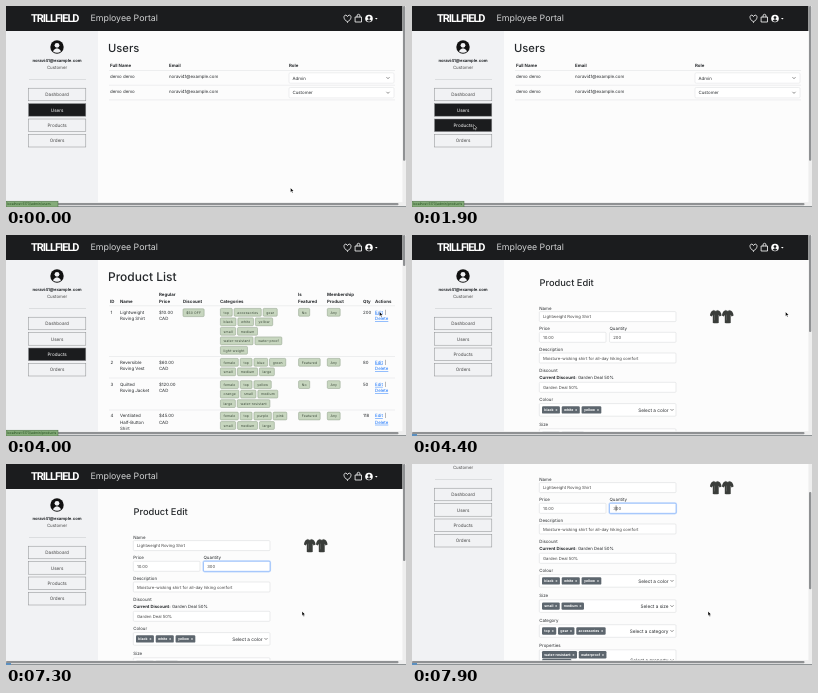
Animation, 400 px wide and 201 px high, one loop 8000 ms. Source, as an HTML page:

```html
<!DOCTYPE html>
<html lang="en">
<head>
<meta charset="utf-8">
<title>Employee Portal</title>
<style>
html, body { margin: 0; width: 100%; height: 100%; overflow: hidden; background: #fcfcfc; }
svg { display: block; width: 100vw; height: 100vh; }
text { font-family: Inter, "Open Sans", sans-serif; white-space: pre; text-rendering: geometricPrecision; }
.logo { font-family: Roboto, "Liberation Sans", sans-serif; letter-spacing: -1px; }
</style>
</head>
<body>
<svg id="stage" viewBox="0 0 400 201"></svg>
<script>
const LOOP = 8000, STEP = 100, VIEW_H = 201;
const EMAIL = 'noravi41@example.com', DEAL = 'Garden Deal 50%', SHIRT = 'Lightweight Roving Shirt';
const INK = '#25282b', DARK = '#1b1c1e', LINE = '#dcdee0', SIDE = '#f1f2f4';
const stage = document.getElementById('stage');

function el(parent, name, attrs) {
  const n = document.createElementNS('http://www.w3.org/2000/svg', name);
  for (const k in attrs) n.setAttribute(k, attrs[k]);
  return parent.appendChild(n);
}
const group = parent => el(parent, 'g', {});
const box = (g, x, y, width, height, fill, more) => el(g, 'rect', { x, y, width, height, fill, ...more });
const path = (g, d, more) => el(g, 'path', { d, fill: 'none', 'stroke-linecap': 'round', 'stroke-linejoin': 'round', ...more });
const rule = (g, x1, x2, y, stroke = LINE) => el(g, 'line', { x1, x2, y1: y, y2: y, stroke, 'stroke-width': .5 });
const show = (n, on) => n.setAttribute('visibility', on ? 'visible' : 'hidden');

// y is the vertical middle of the capitals
function text(g, x, y, str, size = 4.4, more) {
  const n = el(g, 'text', { x, y: y + size * .36, 'font-size': size, fill: INK, ...more });
  n.textContent = str;
  return n;
}
const bold = (g, x, y, str, size = 4.4, more) => text(g, x, y, str, size, { 'font-weight': 700, ...more });
const lines = (g, x, y, list, draw = text) => list.forEach((s, i) => draw(g, x, y + i * 6.5, s));

function chevron(g, x, y) {
  path(g, `M${x - 1.3} ${y - .6}l1.3 1.3 1.3 -1.3`, { stroke: '#444', 'stroke-width': .6 });
}
function person(g, x, y, r, fill, back) {
  el(g, 'circle', { cx: x, cy: y, r, fill });
  el(g, 'circle', { cx: x, cy: y - r * .25, r: r * .36, fill: back });
  path(g, `M${x - r * .62} ${y + r * .62}q${r * .62} ${-r * .85} ${r * 1.24} 0q${-r * .62} ${r * .5} ${-r * 1.24} 0z`, { fill: back });
}

const page = group(stage);

// sidebar
const side = group(page);
box(side, 0, 25, 92, 300, SIDE);
person(side, 51, 41, 6.7, '#111', SIDE);
bold(side, 51, 54.5, EMAIL, 4.2, { 'text-anchor': 'middle' });
text(side, 51, 61.5, 'Customer', 4.4, { 'text-anchor': 'middle', fill: '#444' });
rule(side, 23, 80, 73.5, '#c4c6c9');
const nav = ['Dashboard', 'Users', 'Products', 'Orders'].map((name, i) => {
  const y = 82.2 + i * 15.4;
  const back = box(side, 22.5, y, 57.3, 12.6, SIDE, { stroke: '#8a8c8e', 'stroke-width': .5 });
  const label = text(side, 51.1, y + 6.3, name, 4.6, { 'text-anchor': 'middle' });
  return on => {
    back.setAttribute('fill', on ? DARK : SIDE);
    label.setAttribute('fill', on ? '#fff' : '#444');
  };
});

// header
box(page, 0, 0, 400, 25, DARK);
text(page, 25, 12, 'TRILLFIELD', 11, { class: 'logo', 'font-weight': 700, fill: '#fff' });
text(page, 84.5, 11.8, 'Employee Portal', 8.8, { fill: '#cfd0d1' });
const white = { stroke: '#fff', 'stroke-width': .8 };
path(page, 'M341.5 16 C336 12.5 338 8.6 340 9.2 Q341.2 9.6 341.5 10.6 Q341.8 9.6 343 9.2 C345 8.6 347 12.5 341.5 16z', white);
path(page, 'M349.5 11h6v5h-6zM351 11v-1q0 -1.7 1.5 -1.7t1.5 1.7v1', white);
person(page, 363, 12.5, 3.8, '#fff', DARK);
path(page, 'M369 12h2.6l-1.3 1.4z', { fill: '#fff' });

// users view
const users = group(page);
text(users, 102, 41.5, 'Users', 11.2, { 'font-weight': 500 });
[[104, 'Full Name'], [163, 'Email'], [283, 'Role']].forEach(([x, s]) => bold(users, x, 59.3, s));
rule(users, 103, 389, 64.5);
['Admin', 'Customer'].forEach((role, i) => {
  const y = 71 + i * 14.7;
  text(users, 104, y - .6, 'demo demo');
  text(users, 163, y - .6, EMAIL);
  box(users, 283, y - 4.2, 105, 10.4, '#fff', { rx: 1.2, stroke: LINE, 'stroke-width': .5 });
  text(users, 286.5, y + 1.2, role, 4.4);
  chevron(users, 382, y + 1);
  rule(users, 103, 389, y + 8.2);
});

// product list view
const list = group(page);
text(list, 102, 41.7, 'Product List', 12, { 'font-weight': 500 });
[[104, 'ID'], [114, 'Name'], [177, 'Discount'], [214, 'Categories'], [357, 'Qty'], [369, 'Actions']]
  .forEach(([x, s]) => bold(list, x, 66, s));
[[153, 'Regular', 'Price'], [292, 'Is', 'Featured'], [321, 'Membership', 'Product']]
  .forEach(([x, ...s]) => lines(list, x, 59.5, s, bold));
rule(list, 103, 389, 70.8);

function tag(g, x, y, str) {
  const back = box(g, x, y - 4, 10, 7.8, '#c7d6bf', { rx: 1, stroke: '#8b9d84', 'stroke-width': .5 });
  const t = text(g, x + 3.2, y, str, 3.4, { 'letter-spacing': .15, fill: '#3a4838' });
  const w = t.getComputedTextLength() + 6.2;
  back.setAttribute('width', w);
  return x + w + 1.9;
}
[
  [77, 121.5, ['Lightweight', 'Roving Shirt'], '$10.00', 'No', 200,
    'top accessories gear|black white yellow|small medium|water-resistant water-proof|light-weight'],
  [127, 143, ['Reversible', 'Roving Vest'], '$60.00', 'Featured', 80,
    'female top blue green|small medium large'],
  [149.3, 175, ['Quilted', 'Roving Jacket'], '$120.00', 'No', 50,
    'female top yellow|orange small medium|large water-resistant'],
  [180.7, 215, ['Ventilated', 'Half-Button', 'Shirt'], '$45.00', 'Featured', 118,
    'female top purple pink|small medium large']
].forEach(([y, end, name, price, featured, qty, tags], i) => {
  text(list, 104.5, y, i + 1);
  lines(list, 114, y, name);
  lines(list, 153, y, [price, 'CAD']);
  if (!i) tag(list, 177, y + .8, '$50 OFF');
  tags.split('|').forEach((row, r) =>
    row.split(' ').reduce((x, s) => tag(list, x, y + .4 + r * 9.5, s), 214.4));
  tag(list, 292.6, y + .4, featured);
  tag(list, 321.3, y + .4, 'Any');
  text(list, 357, y, qty);
  const link = { fill: '#0d6efd', 'text-decoration': 'underline' };
  text(list, 369, y, 'Edit', 4.4, link);
  text(list, 378.8, y, '|');
  text(list, 369, y + 6.5, 'Delete', 4.4, link);
  rule(list, 103, 389, end);
});

// product edit view
const edit = group(page);
text(edit, 127.5, 47.3, 'Product Edit', 9.3, { 'font-weight': 500 });
const frame = { rx: 1, stroke: LINE, 'stroke-width': .6 };
const halo = box(edit, 197.5, 97.3, 66.5, 10, 'none', { rx: 1, stroke: '#c4dbfd', 'stroke-width': 2.2 });
function field(x, y, w, label, value) {
  if (label) text(edit, x, y - 8.4, label, 4.4);
  const back = box(edit, x, y - 5, w, 10, '#fff', frame);
  return [back, text(edit, x + 3.7, y + .1, value, 4.2, { fill: '#444' })];
}
field(127.3, 81.6, 136.7, 'Name', SHIRT);
field(127.3, 102.3, 66.7, 'Price', '10.00');
const [qtyBox, qtyText] = field(197.5, 102.3, 66.5, 'Quantity', '200');
field(127.3, 123, 136.7, 'Description', 'Moisture-wicking shirt for all-day hiking comfort');
text(edit, 127.3, 135.3, 'Discount', 4.4);
const now = bold(edit, 127.3, 142, 'Current Discount:', 4.3);
text(edit, 128.6 + now.getComputedTextLength(), 142, DEAL, 4.3);
field(127.3, 152.3, 136.7, '', DEAL);

function chip(x, y, str) {
  const back = box(edit, x, y - 3.7, 10, 7.4, '#5d666e', { rx: 1.2 });
  const t = bold(edit, x + 2.3, y, str + '  ×', 3.5, { fill: '#fff' });
  const w = t.getComputedTextLength() + 4.6;
  back.setAttribute('width', w);
  return x + w + 1.8;
}
[
  [164.6, 'Colour', 'black white yellow', 'Select a color'],
  [189.8, 'Size', 'small medium', 'Select a size'],
  [214.7, 'Category', 'top gear accessories', 'Select a category'],
  [239.8, 'Properties', 'water-resistant waterproof|light-weight', 'Select a property']
].forEach(([y, label, chips, hint]) => {
  const rows = chips.split('|'), h = 12.6 + (rows.length - 1) * 8;
  text(edit, 127.3, y, label, 4.4);
  box(edit, 127.3, y + 4, 136.7, h, '#fff', frame);
  rows.forEach((row, r) => row.split(' ').reduce((x, s) => chip(x, y + (rows[1] ? 9 : 10.3) + r * 8, s), 130));
  text(edit, 256.5, y + 4 + h / 2, hint, 4.7, { 'text-anchor': 'end' });
  chevron(edit, 260, y + 4 + h / 2);
});
for (const x of [298.5, 310.5]) {
  path(edit, `M${x + 3.3} 75.3q1.9 1.2 3.8 0q3.4 .6 4 5.2l-2 .9 -.9 -1.6v8.2q-3 .7 -5.9 0v-8.2l-.9 1.6 -2 -.9q.6 -4.6 3.9 -5.2z`, { fill: '#3a3d3a' });
  path(edit, `M${x + 3.3} 75.5q1.9 1.6 3.8 0M${x + 4} 80v5`, { stroke: '#6d716c', 'stroke-width': .5 });
}
const caret = box(edit, 203.8, 99.4, .5, 5.8, '#111');

// window chrome
const TRACK = '#eeeeee', THUMB = '#8f9193';
box(stage, 396.4, 0, 3.6, VIEW_H, TRACK);
const thumb = box(stage, 397, 0, 2.3, 10, THUMB, { rx: 1 });
box(stage, 0, 196.2, 400, 4.8, TRACK);
box(stage, 0, 197, 392.5, 2.2, THUMB, { rx: 1 });
box(stage, 0, 200.2, 400, .8, '#777d80');
box(stage, 0, 199, 5, 2, '#5b8fc0');
const status = group(stage);
box(status, 0, 195.2, 52, 5.8, '#84ab79', { stroke: '#45683f', 'stroke-width': .5 });
const url = text(status, 1, 198.1, '', 3.4, { fill: '#1f4a1a' });

const mouse = path(stage, 'M0 0v4.2l1 -.9 .7 1.6 .8 -.3 -.7 -1.6h1.4z',
  { fill: '#000', stroke: '#fff', 'stroke-width': .4 });

// time, x, y
const moves = [
  [0, 284.5, 182], [900, 61.5, 119], [1900, 61.5, 119], [2600, 274, 75.5], [2700, 274, 75.5],
  [3600, 373.5, 77], [4400, 373.5, 77], [5400, 203.5, 103], [7000, 203.5, 103], [7300, 296, 147.5], [LOOP, 296, 147.5]
];
const scrolls = [[0, 0], [7400, 0], [7900, 58], [LOOP, 58]];
const heights = new Map([[users, 261], [list, 1300], [edit, 416]]);

function at(keys, t) {
  const i = keys.findIndex(k => k[0] > t), a = keys[i - 1], b = keys[i];
  const p = (t - a[0]) / (b[0] - a[0]), e = p * p * (3 - 2 * p);
  return a.slice(1).map((v, n) => v + (b[n + 1] - v) * e);
}

function draw(ms) {
  const t = Math.floor(ms % LOOP / STEP) * STEP;
  const view = t < 2000 ? users : t < 4300 ? list : edit;
  [users, list, edit].forEach(v => show(v, v === view));

  const [mx, my] = at(moves, t), [scroll] = at(scrolls, t);
  const ratio = VIEW_H / heights.get(view);
  page.setAttribute('transform', `translate(0 ${-scroll})`);
  thumb.setAttribute('y', scroll * ratio);
  thumb.setAttribute('height', VIEW_H * ratio);
  mouse.setAttribute('transform', `translate(${mx} ${my})`);
  show(mouse, t < 6200 || t >= 7100);

  nav[0](false);
  nav[1](view === users);
  nav[2](view === list || (view === users && t >= 900));
  nav[3](false);

  const focus = t >= 5700;
  show(halo, focus && view === edit);
  qtyBox.setAttribute('stroke', focus ? '#78aaf8' : LINE);
  qtyText.textContent = t < 6300 ? '200' : t < 6700 ? '00' : '300';
  caret.setAttribute('x', t >= 6300 && t < 6700 ? 201 : 203.8);
  show(caret, focus && (t < 5900 || (t >= 6100 && t < 7100) || t >= 7500));

  show(status, view !== edit);
  url.textContent = 'localhost:5173/admin/' + (t < 900 ? 'users' : 'products');
}

const start = performance.now();
function tick() {
  draw(performance.now() - start);
  requestAnimationFrame(tick);
}
tick();
</script>
</body>
</html>
```
